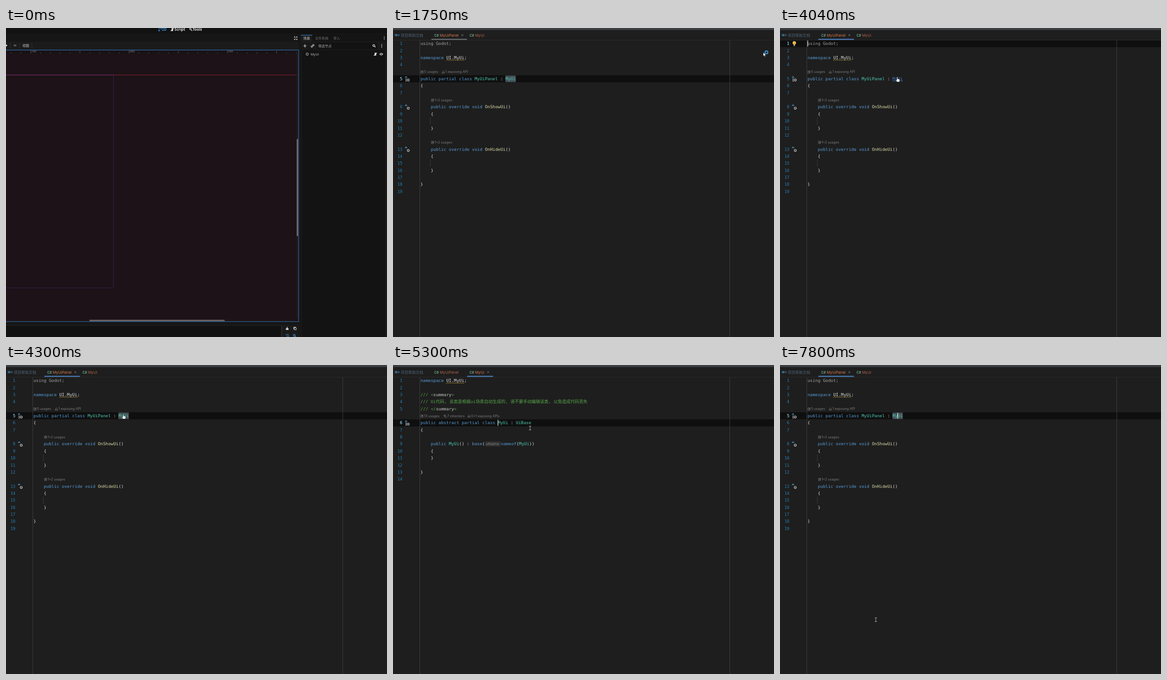
An HTML page that plays this animation: 831 by 674 pixels, repeating every 8000 ms.

```html
<!DOCTYPE html>
<html lang="zh">
<head>
<meta charset="utf-8">
<style>
html, body { margin: 0; width: 100%; height: 100%; overflow: hidden; background: #1e1e1e; }
svg { display: block; }
text { white-space: pre; font-family: Inter, "Noto Sans CJK SC", "Noto Sans CJK", sans-serif; }
.mono { font-family: "DejaVu Sans Mono", "Noto Sans CJK SC", "Noto Sans CJK", monospace; }
.noto { font-family: "Noto Sans", "Noto Sans CJK SC", "Noto Sans CJK", sans-serif; }
.bold { font-weight: 700; }
.semi { font-weight: 600; }
</style>
</head>
<body>
<svg id="stage" width="831" height="674" viewBox="0 0 831 674"></svg>
<script>
const LOOP = 8000, ROW = 15.36, CHAR = 5.617, CODE_X = 60;
const COLORS = { key: '#569cd6', type: '#4ec9b0', call: '#dcdcaa', plain: '#dcdcdc', dim: '#a2a2a2', doc: '#57a64a' };

const rowY = i => 34 + i * ROW;
const colX = c => CODE_X + c * CHAR;
const esc = s => s.replace(/&/g, '&amp;').replace(/</g, '&lt;');
const rect = (x, y, w, h, fill, more = '') => `<rect x="${x}" y="${y}" width="${w}" height="${h}" fill="${fill}" ${more}/>`;
const path = (d, stroke, width = 1, more = '') => `<path d="${d}" fill="none" stroke="${stroke}" stroke-width="${width}" ${more}/>`;
const shape = (d, fill, more = '') => `<path d="${d}" fill="${fill}" ${more}/>`;
const ring = (x, y, r, stroke, width) => `<circle cx="${x}" cy="${y}" r="${r}" fill="none" stroke="${stroke}" stroke-width="${width}"/>`;
const dot = (x, y, r, fill) => `<circle cx="${x}" cy="${y}" r="${r}" fill="${fill}"/>`;
const raw = (x, y, html, fill, size, cls = '', more = '') =>
  `<text x="${x}" y="${y}" fill="${fill}" font-size="${size}" class="${cls}" ${more}>${html}</text>`;
const text = (x, y, s, ...rest) => raw(x, y, esc(s), ...rest);
const on = (name, ...parts) => `<g data-on="${name}">${parts.join('')}</g>`;

// ---------- scene editor ----------
function ruler() {
  let out = '';
  for (let i = -2; i < 28; i++) {
    const x = 54 + i * 21.45, h = i % 10 === 0 ? 7 : i % 5 === 0 ? 5 : 2.2;
    out += path(`M${x} 55.5v${-h}`, '#6f6b6e', 0.8);
    if (i % 10 === 0 && i >= 0) out += text(x + 1.5, 53, String(1500 + i * 50), '#8d898c', 4.6, 'noto');
  }
  return out;
}
const lens = (x, y, c) => ring(x - 0.8, y - 0.8, 2, c, 1.2) + path(`M${x + 0.8} ${y + 0.8}l2.2 2.2`, c, 1.3);
const dots = (x, y, c) => [-2.8, 0, 2.8].map(d => dot(x, y + d, 0.9, c)).join('');
const scroll = (x, y) => shape(`M${x - 1.5} ${y - 3}h5v1.7h-1.5v3.4q0 1.2-1.2 1.2h-4.3v-1.6h2z`, '#e0e0e0');

function sceneEditor() {
  const blue = '#3b8ad8', light = '#dedede';
  return [
    rect(0, 0, 831, 674, '#161616'), rect(0, 0, 831, 12, '#121212'),
    path('M333.5 6v-4.5h6M333.5 6h3', blue, 1), dot(333.5, 6, 1.3, blue), dot(339, 1.6, 1.2, blue),
    text(340, 6.3, '2D', blue, 8, 'noto semi'),
    scroll(362.5, 3.5), text(367.5, 6.3, 'Script', light, 8, 'noto semi'),
    ring(402, 2, 1.7, light, 1.1), path('M403 3l3 3.3', light, 1.5),
    text(407, 6.3, 'Tools', light, 8, 'noto semi'),
    path('M629 21v-2h2M633 19h2v2M635 23.5v2h-2M631 25.5h-2v-2M629.3 19.3l2 2M634.7 19.3l-2 2M629.3 25.2l2-2M634.7 25.2l-2-2', light, 1),
    rect(0, 30, 639, 17, '#1b1b1b'),
    path('M9.5 32v12M30 32v12M56.5 32v12', '#303030', 1),
    shape('M0 35.5l3.2 2.5-3.2 2.5z', light), shape('M16 38l3-2.8v1.3h3.5v3.6h-4z', '#565b60'),
    text(36, 41, '视图', '#c4c4c4', 7.3, 'noto'),
    rect(0, 48, 638, 592, '#1c1217'), rect(0, 48, 638, 8, '#181215'), ruler(),
    path('M0 102.5H234', '#8c2f78', 1), path('M234 102.5H638', '#8c2434', 1),
    path('M234.5 103V567H0', '#3a2156', 1),
    rect(634, 56, 3.5, 578, '#21191d'), rect(0, 636.5, 631, 3, '#21191d'),
    rect(634, 242, 3, 212, '#6e6a6c', 'rx="1"'), rect(182, 636.5, 295, 3, '#6e6a6c', 'rx="1"'),
    on('viewFocus', path('M0 48.1H638.2V640.5H0', '#2f73b5', 1.1)),
    rect(0, 647, 639, 27, '#1a1a1a'), rect(0, 650, 599, 24, '#111'), path('M601.5 650V674', '#3a3a3a', 1),
    shape('M612.5 652h1.6v3h2v3.5h-5.6v-3.5h2z', light),
    path('M627.5 657v-4.5h4.5', light, 1), path('M628.8 653.8h4.2v4.4h-4.2z', light, 1),
    path('M610 668.5h7M612.5 671h4.5M612.5 673.5h4.5M610 671h1', blue, 1.1), lens(629.5, 671, blue),
    rect(643, 14, 188, 15, '#141414'), rect(643, 29, 188, 645, '#191919'),
    rect(643, 15, 25, 15, '#1d1d1d'), rect(643, 15, 25, 1.2, '#3b7fc0'),
    text(648.5, 24.5, '场景', '#d0d0d0', 7.3, 'noto'),
    text(674, 24.5, '文件系统', '#737373', 7.3, 'noto'), text(714, 24.5, '导入', '#737373', 7.3, 'noto'),
    dots(825, 22, '#b5b5b5'),
    path('M648.5 39h7M652 35.5v7', light, 1.2),
    ring(670.3, 37.6, 1.6, light, 1.1), ring(667, 40.6, 1.6, light, 1.1),
    rect(677, 32, 133, 14, '#121212', 'rx="1"'), text(681, 41.6, '筛选节点', '#a8a8a8', 7.3, 'noto'),
    lens(803, 39, light), dots(819.5, 39, light),
    rect(645, 48, 182, 626, '#131313'),
    on('treeFocus', rect(645.5, 48.1, 181, 625.4, 'none', 'stroke="#2f73b5"')),
    ring(657, 57, 2.5, '#d5d5d5', 1), text(664.5, 59.8, 'MyUi', '#b5b5b5', 7.5, 'noto'),
    scroll(805.5, 57),
    shape('M814.5 57q4-5.6 8 0q-4 5.6-8 0z', light), dot(818.5, 57, 1.8, '#131313'), dot(818.5, 57, 0.8, light)
  ].join('');
}

// ---------- code editor ----------
const FILE_A = ['using Godot;', '', 'namespace UI.MyUi;', '', null, 'public partial class MyUiPanel : ', '{', '', null,
  '    public override void OnShowUi()', '    {', '', '    }', '', null,
  '    public override void OnHideUi()', '    {', '', '    }', '', '}', ''];
const FILE_B = ['namespace UI.MyUi;', '', '/// <summary>',
  '/// Ui代码, 该类是根据ui场景自动生成的, 请不要手动编辑该类, 以免造成代码丢失', '/// </summary>', null,
  'public abstract partial class MyUi : UiBase', '{', '', '    public MyUi() : base(', '    {', '    }', '', '}', ''];

const TOKENS = /(?<key>\b(?:using|namespace|public|partial|class|override|void|abstract|base|nameof)\b)|(?<type>(?<!\.)\b(?:MyUiPanel|MyUi|UiBase)\b)|(?<call>\bOn\w+)/g;
const tint = (s, c) => `<tspan fill="${c}">${s}</tspan>`;
function paint(line) {
  if (line.startsWith('using')) return tint(line, COLORS.dim);
  if (line.startsWith('///')) return tint(esc(line).replace('summary', tint('summary', '#c8c8c8')), COLORS.doc);
  return line.replace(TOKENS, (m, ...a) => {
    const groups = a[a.length - 1];
    return tint(m, COLORS[Object.keys(groups).find(k => groups[k])]);
  });
}
const code = (x, row, html) => raw(x, rowY(row) + 3.2, html, COLORS.plain, /[代]/.test(html) ? 9.24 : 9.33, 'mono');
const lineNo = (n, row, fill) => text(20.5, rowY(row) + 3.2, String(n), fill, 9, 'mono', 'text-anchor="end"');

function listing(lines) {
  let n = 0;
  return lines.map((s, i) => s === null ? '' : lineNo(++n, i, '#2480b4') + (s && code(CODE_X, i, paint(s)))).join('');
}
const active = (name, row) => on(name, rect(0, rowY(row) - 7.7, 831, ROW, '#0f0f0f'));
const activeNo = (name, row, n) => on(name, lineNo(n, row, '#a9cfdf'));
const caret = (name, x, row) => on(name, rect(x - 0.6, rowY(row) - 6.5, 1.3, 13, '#e6e6e6'));
const mark = (x, row) => rect(x, rowY(row) - 7.2, 4 * CHAR, 14.4, '#434e55');

function hint(x, row, s, icon = 0) {
  const y = rowY(row) + 0.6, c = '#7c7c7c';
  const icons = [
    path(`M${x + 0.8} ${y - 2.5}h4.8v5h-4.8zM${x + 2} ${y + 1.3}l2.3-2.3M${x + 2.5} ${y - 1.2}h2v2`, c, 0.8),
    path(`M${x + 0.8} ${y + 2.5}v-3l2.4-2.2 2.4 2.2v3h-1.6v-1.6h-1.6v1.6z`, c, 0.8),
    path(`M${x + 0.6} ${y + 0.6}v-3h3.2M${x + 2.2} ${y - 0.8}h3.2v3.4h-3.2z`, c, 0.8)];
  return icons[icon] + text(x + 7.7, y + 2.2, s, c, 7.2);
}
function gutter(row, withI) {
  const y = rowY(row);
  return path(`M26.2 ${y - 2.2}l2.3-2.6 2.3 2.6`, '#4aa0d0', 1.3) + ring(33.3, y + 2.7, 2.2, '#aeb4b8', 1.5) +
    (withI ? path(`M27 ${y + 0.2}h3M27 ${y + 5.2}h3M28.5 ${y}v5`, '#aeb4b8', 1.1) : '');
}
function squiggle(row) {
  const y = rowY(row) + 5;
  let d = `M116 ${y}`;
  for (let i = 0; i < 10; i++) d += 'q1 2.4 2 .6t2-.6';
  return path(d, '#b89b3e', 0.8);
}
const guide = row => path(`M81.5 ${rowY(row) - 8}v16`, '#3a3a3a', 1);
const fileIcon = (x, y) => text(x, y, 'C#', '#74b795', 7, 'semi');

function tab(x, name, hot, cross) {
  return fileIcon(x, 18.5) + text(x + 12, 18.8, name, hot ? '#d4784a' : '#b2644a', 8.1) +
    (cross ? path(`M${cross - 2} 13.6l4 4m0-4l-4 4`, '#8f969b', 0.8) : '');
}
const underline = (name, x, w, c) => on(name, rect(x, 23.6, w, 2.4, c, 'rx="1"'));

function popup() {
  const kinds = [['PropertyDefVal', 3, 'PropertyDefVal'], ['Path', 5, 'PathAttribute'], ['Serialization', 6, 'Serialization'],
    ['Signals', 6, 'Signals'], ['Properties', 6, 'Properties'], ['Methods', 6, 'Methods']];
  const rows = [['MyUi.cs', 6, 'src\\game\\ui\\myUi'], ...kinds.map(([a, n, b]) =>
    [`UI.MyUi.MyUi_Script${a}.generated.cs`, n, `Godot.SourceGenerators.Script${b}Generator`])];
  return rect(256.5, 118.5, 544.5, 110, '#2b2b2b', 'stroke="#4c4e50"') + rect(257, 119, 543.5, 15.5, '#37393b') +
    text(260, 129.8, "Declarations of class 'MyUi'", '#bcbcbc', 8.3) +
    path('M790.5 123h4.5M791.2 123v4h3v-4M789.5 127.3h6.5M792.7 127.5v3.5', '#b5b9bc', 1) +
    rect(257, 134.2, 543.5, 13.4, '#2f5596') +
    rows.map(([name, n, where], i) => {
      const y = 143.6 + i * 13.45;
      return fileIcon(259.5, y) +
        raw(270.5, y, `${name} ${tint(`(${n})`, '#8fb4d8')}`, i ? '#adc3d4' : '#cfdcec', 8.15) +
        text(797, y, `in <DungeonShooting>\\${where}`, i ? '#8e9296' : '#d8e0ec', 8.4, '', 'text-anchor="end"');
    }).join('');
}

const bulb = dot(31.2, 32.4, 3.7, '#f0c34a') + rect(29.6, 35, 3.2, 2, '#e0b040') + rect(29.8, 37.4, 2.8, 2, '#b9bcbe') +
  path('M30 32l1.2 1.2 1.2-1.2', '#7a5c1a', 0.7);
const hammer = path('M30 124.5l5.5 6', '#a4a8aa', 2) + path('M26.4 125.8l4.4-4.4', '#c0c3c5', 2.8);

function codeEditor() {
  return [
    rect(0, 0, 831, 674, '#1e1e1e'), rect(0, 0, 831, 4.5, '#3c3f41'),
    active('a1', 0), active('a5', 5), active('b6', 6),
    path('M58.5 27V674M734.5 27V674', '#3d3d3d', 1),
    path('M0 26.5H831', '#2b2b2b', 1),
    on('hover', rect(83, 5, 78, 21, '#2b2d2e')),
    text(4, 18.2, 'M↓', '#4791c0', 6.2, 'bold'), text(17, 19, '项目帮助文档', '#4f6678', 8.15),
    on('fileA', tab(90, 'MyUiPanel', true, 151.3), tab(167, 'MyUi', false)),
    on('fileB', tab(90, 'MyUiPanel', false), tab(167, 'MyUi', true, 207.5)),
    on('hover', path('M149.3 13.6l4 4m0-4l-4 4', '#8f969b', 0.8)),
    underline('greyA', 83.5, 78, '#64686b'), underline('blueA', 83.5, 78, '#4673ac'), underline('blueB', 161.5, 57, '#4673ac'),
    on('fileA',
      on('markA', mark(colX(33), 5)), listing(FILE_A),
      on('ref', code(colX(33), 5, tint('MyUi', COLORS.type))),
      on('link', code(colX(33), 5, tint('MyUi', '#3a78c8')), path(`M${colX(33)} 115.6h22.5`, '#3a78c8', 0.9)),
      squiggle(2), hint(60, 4, '5 usages'), hint(106.5, 4, '1 exposing API', 1),
      hint(83, 8, '1+2 usages'), hint(83, 14, '1+2 usages'), guide(11), guide(17),
      gutter(5, true), gutter(9), gutter(15)),
    activeNo('a1', 0, 1), activeNo('a5', 5, 5), on('bulb', bulb),
    caret('caret1', 60.5, 0), caret('caret5', 256.6, 5),
    on('fileB',
      on('markB', mark(colX(30), 6), mark(275, 9)), listing(FILE_B),
      rect(201, 166.6, 34, 11.2, '#2e2e2e', 'rx="2"'), text(202.6, 174.9, 'uiName:', '#808080', 7.8),
      code(235.5, 9, paint('nameof(MyUi))')), squiggle(0),
      hint(60, 5, '13 usages'), hint(110.5, 5, '7 inheritors', 2), hint(162.5, 5, '0+1 exposing APIs', 1)),
    activeNo('b6', 6, 6), on('overB', gutter(6, true)), on('hammer', hammer),
    caret('caretB', 228.9, 6),
    on('popup', popup())
  ].join('');
}

// ---------- pointer ----------
const edge = 'stroke="#111" stroke-width=".7" stroke-linejoin="round"';
const arrow = shape('M0 0V8.6L2 6.9 3.4 9.8 4.9 9.1 3.6 6.2H6.1Z', '#fff', edge);
const hand = shape('M-2.2-5.6q0-1 .9-1t.9 1v3.3l3.4.8q1.4.4 1.2 1.9l-.6 4.4h-5.2l-3-3.8q-.6-1.2 1-.8l1.4.8z', '#fff', edge);
const beam = path('M-2.4-4.2h1.6q.8 0 .8.9v6.6q0 .9.8.9h1.6M2.4-4.2h-1.6q-.8 0-.8.9M0 3.3q0 .9-.8.9h-1.6', '#c9c9c9', 0.9);
const pointers = on('arrow', arrow) + on('hand', hand) + on('beam', beam) + on('busy', arrow, ring(7, 0.2, 3.1, '#3b9fe0', 2));

// ---------- timeline: start, visible parts, pointer, x, y ----------
const A = 'code fileA ', A1 = A + 'a1 ref blueA ', A5 = A + 'a5 ref markA ';
const B = 'code fileB b6 blueB ', B2 = B + 'markB hammer ';
const STEPS = [
  [0, 'scene viewFocus'],
  [500, 'scene viewFocus', 'arrow', 420, 330],
  [750, 'scene viewFocus', 'arrow', 660, 160],
  [1000, 'scene viewFocus', 'arrow', 790, 70],
  [1250, 'scene viewFocus', 'arrow', 807, 53],
  [1500, 'scene treeFocus', 'arrow', 807, 53],
  [1750, A5 + 'greyA', 'busy', 807.5, 53],
  [2000, A1 + 'caret1', 'beam', 720, 80],
  [2250, A1 + 'caret1', 'beam', 480, 130],
  [2500, A1, 'beam', 250, 165],
  [2750, A1, 'beam', 160, 176],
  [3010, A1 + 'caret1', 'beam', 148, 168],
  [3280, A1 + 'caret1 bulb', 'beam', 170, 190],
  [3530, A1 + 'bulb', 'beam', 225, 175],
  [3780, A1 + 'bulb', 'beam', 254, 125],
  [4040, A + 'a1 link blueA caret1 bulb', 'hand', 257, 113],
  [4300, A5 + 'blueA', 'hand', 257, 113],
  [4550, A5 + 'greyA popup', 'arrow', 257, 109],
  [4800, A5 + 'greyA popup', 'hand', 284, 137],
  [5050, A5 + 'greyA popup', 'hand', 299, 142],
  [5300, B + 'overB caretB', 'beam', 299, 137.5],
  [5550, B2, 'beam', 272, 160],
  [5800, B2, 'beam', 262, 180],
  [6050, B2 + 'caretB', 'beam', 240, 172],
  [6300, B2 + 'caretB', 'beam', 204, 140],
  [6550, B2, 'beam', 160, 95],
  [6800, B2, 'beam', 124, 59],
  [7050, B2 + 'caretB hover', 'arrow', 127.5, 24],
  [7300, A5 + 'blueA caret5', 'arrow', 126, 18],
  [7550, A5 + 'blueA caret5', 'beam', 190, 380],
  [7800, A5 + 'blueA caret5', 'beam', 209, 555.5]
];

const stage = document.getElementById('stage');
stage.innerHTML = on('scene', sceneEditor()) + on('code', codeEditor()) + `<g id="pointer">${pointers}</g>`;
const pointer = document.getElementById('pointer');
const parts = [...stage.querySelectorAll('[data-on]')];
const start = performance.now();
let shown;

function show([, names, cursor, x = 0, y = 0]) {
  const visible = new Set(names.trim().split(' ').concat(cursor || []));
  for (const el of parts) el.style.display = visible.has(el.dataset.on) ? '' : 'none';
  pointer.setAttribute('transform', `translate(${x} ${y})`);
}
function tick() {
  const t = (performance.now() - start) % LOOP;
  const step = STEPS.findLast(s => s[0] <= t);
  if (step !== shown) show(shown = step);
  requestAnimationFrame(tick);
}
tick();
</script>
</body>
</html>
```
